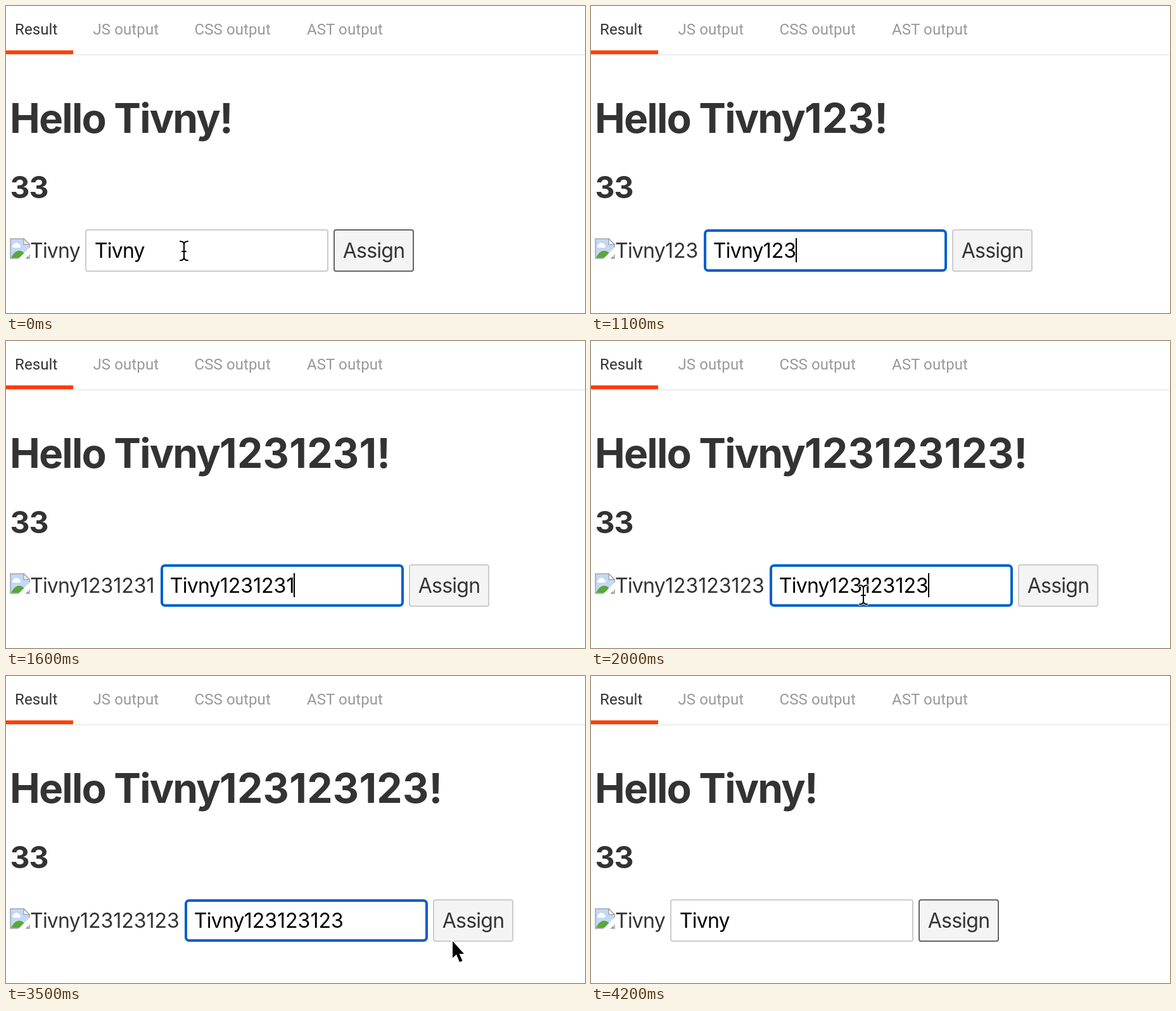
Animation, 914 px wide and 484 px high, one loop 4.7 s. Source, as an HTML page:

```html
<!DOCTYPE html>
<html lang="en">
<head>
<meta charset="utf-8">
<title>Assign demo</title>
<style>
  html, body { margin: 0; width: 100%; height: 100%; overflow: hidden; background: #fff; }
  svg { display: block; width: 100%; height: 100%; }
  text { font: 32px Inter, sans-serif; font-optical-sizing: none; letter-spacing: -.024em; fill: #333; white-space: pre; }
  .tab { font: 24px Roboto, sans-serif; letter-spacing: .1px; fill: #999; }
  .active { fill: #333; }
  .big { font-size: 64px; font-weight: 700; letter-spacing: -.028em; }
  .mid { font-size: 48px; font-weight: 700; letter-spacing: -.02em; }
  .digits { letter-spacing: 0; }
  .big .digits { letter-spacing: .005em; }
  #value { fill: #000; }
</style>
</head>
<body>
<svg viewBox="0 0 914 484">
  <text class="tab active" x="14" y="45">Result</text>
  <text class="tab" x="137.5" y="45">JS output</text>
  <text class="tab" x="297.5" y="45">CSS output</text>
  <text class="tab" x="475" y="45">AST output</text>
  <path d="M0 76H914V78H0Z" fill="#eee"/>
  <path d="M0 70H106V76H0Z" fill="#ff3e00"/>

  <text class="big" x="6" y="200">Hello <tspan class="name"></tspan><tspan class="digits"></tspan>!</text>
  <text class="mid" x="6.5" y="303">33</text>

  <g id="missing-image">
    <path d="M7 367H28L37 376V398H7Z" fill="#c4d8f5" stroke="#a3a7ad" stroke-width="1.5"/>
    <path d="M11 381a3 3 0 0 1 1-5a5 5 0 0 1 9 0a3 3 0 0 1 1 5Z" fill="#fff"/>
    <path d="M8 397C11 389 20 381 28 389L36 397Z" fill="#58a83b"/>
    <path d="M28 367V376H37Z" fill="#fff" stroke="#a3a7ad" stroke-width="1.5"/>
    <path d="M39 379L18 400H29L39 390Z" fill="#fff"/>
  </g>
  <text x="38" y="397"><tspan class="name"></tspan><tspan class="digits"></tspan></text>

  <g id="controls">
    <rect id="field" fill="#fff"/>
    <text id="value" x="139.8" y="397"><tspan class="name"></tspan><tspan class="digits"></tspan></text>
    <rect id="caret" y="366" width="2" height="38"/>
    <rect id="button" x="518" y="353" width="125" height="65" rx="3" stroke-width="2"/>
    <text x="531.8" y="397">Assign</text>
  </g>

  <g id="beam" fill="none" stroke-linecap="round">
    <path id="beam-shape" d="M-6 -15Q0 -15 0 -10V10Q0 15 -6 15M6 -15Q0 -15 0 -10M0 10Q0 15 6 15M-3 1H3"/>
    <use href="#beam-shape" stroke="#fff" stroke-width="4"/>
    <use href="#beam-shape" stroke="#000" stroke-width="2"/>
  </g>
  <path id="arrow" d="M0 0V26.5L6 21L11 33L15.5 31L10.5 20H18Z" stroke="#fff" stroke-width="3" paint-order="stroke"/>
</svg>
<script>
const LOOP = 4700, STEP = 100, NAME = 'Tivny';
const DIGIT_ADVANCE = { 1: 14, 2: 18.4, 3: 20 };
const FOCUS = 200, PRESS = 3800, RELEASE = 3900;

// [start time, number of typed digits]
const typing = [[0, 0], [900, 1], [1000, 2], [1100, 3], [1300, 4], [1400, 6], [1600, 7], [1700, 9], [RELEASE, 0]];

// [start time, shape, x, y]
const pointer = [
  [0, 'beam', 281, 386], [900, ''],
  [1900, 'beam', 300, 388], [2000, 'beam', 430, 400],
  [2100, 'arrow', 600, 425], [2200, 'arrow', 735, 465], [2300, ''],
  [3400, 'arrow', 650, 470], [3500, 'arrow', 705, 418],
  [3600, 'arrow', 738, 384], [4000, 'arrow', 741, 391], [4200, '']
];

const $ = id => document.getElementById(id);
const at = (track, t) => track.findLast(key => key[0] <= t);
const set = (id, attributes) => {
  for (const name in attributes) $(id).setAttribute(name, attributes[name]);
};
const show = (id, visible) => set(id, { visibility: visible ? 'visible' : 'hidden' });
const fill = (selector, text) => {
  for (const span of document.querySelectorAll(selector)) span.textContent = text;
};

function caretOn(t) {
  if (t < FOCUS || t >= PRESS) return false;
  const blinkStart = t < 900 ? FOCUS : t < 1700 ? t : 1700;
  return Math.floor((t - blinkStart) / 500) % 2 === 0;
}

function draw(t) {
  const digits = '123123123'.slice(0, at(typing, t)[1]);
  fill('.digits', digits);
  const shift = [...digits].reduce((sum, digit) => sum + DIGIT_ADVANCE[digit], 0.2);
  set('controls', { transform: `translate(${Math.round(shift)})` });

  const focused = t >= FOCUS && t < PRESS;
  set('field', focused
    ? { x: 127, y: 354, width: 380, height: 63, rx: 5, stroke: '#005fcc', 'stroke-width': 4 }
    : { x: 126, y: 353, width: 382, height: 65, rx: 3, stroke: '#ccc', 'stroke-width': 2 });
  set('button', {
    fill: t >= PRESS && t < RELEASE ? '#dadada' : '#f4f4f4',
    stroke: focused ? '#ccc' : '#666'
  });
  set('caret', { x: Math.round(138.8 + $('value').getComputedTextLength()) });
  show('caret', caretOn(t));

  const [, shape, x, y] = at(pointer, t);
  for (const id of ['beam', 'arrow']) show(id, id === shape);
  if (shape) set(shape, { transform: `translate(${x} ${y})` });
}

function tick() {
  const t = performance.now() % LOOP;
  draw(Math.floor(t / STEP) * STEP);
  requestAnimationFrame(tick);
}

fill('.name', NAME);
tick();
</script>
</body>
</html>
```
